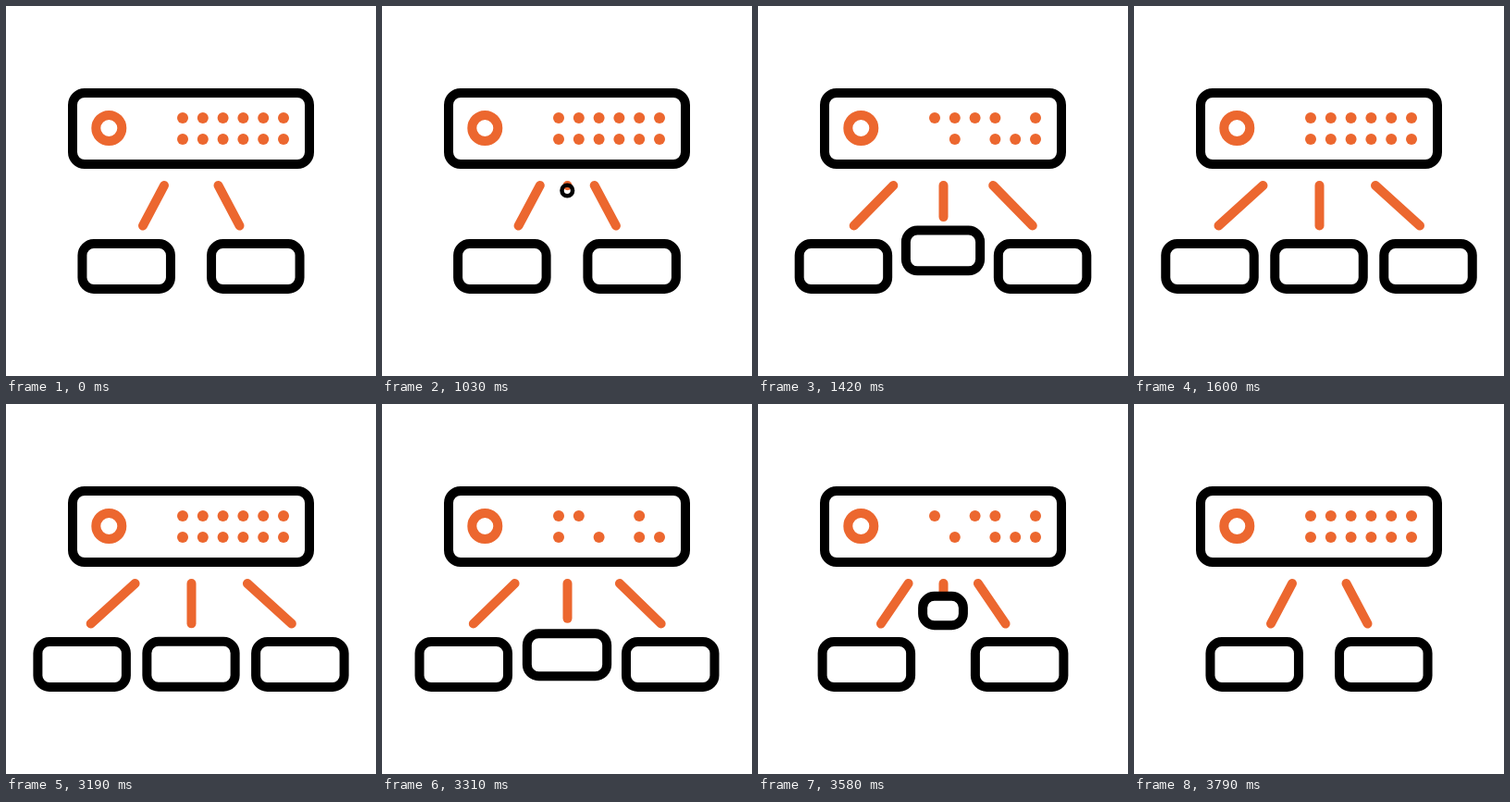
Recreate the animation shown at these times as an HTML page. Size 400x400 px, loop 3820 ms.

```html
<!DOCTYPE html>
<html lang="en">
<head>
<meta charset="utf-8">
<title>Router</title>
<style>
html, body { margin: 0; width: 100%; height: 100%; overflow: hidden; background: #fff; }
svg { display: block; width: 100%; height: 100%; }
.ink { fill: none; stroke: #000; stroke-width: 10; }
.hot { fill: none; stroke: #ec672f; stroke-width: 10; stroke-linecap: round; }
.dot { fill: #ec672f; }
</style>
</head>
<body>
<svg id="stage" viewBox="0 0 400 400"></svg>
<script>
const LOOP = 3820, STEP = 30;
const OPEN = [1000, 1600], CLOSE = [3170, 3790];
const BOX_W = 95.5, BOX_H = 49, BOX_Y = 281.5, LINE_TOP = 194, LINE_END = 237.5;

// Off window of each dot in ms after a move begins: top row, then bottom row
const BLINK = [
  [200, 330], [300, 420], [60, 180], [130, 265], [360, 480], [90, 210],
  [390, 510], [90, 200], [330, 450], [50, 160], [430, 540], [180, 300]
];

const stage = document.getElementById('stage');

function set(el, attrs) {
  for (const k in attrs) el.setAttribute(k, attrs[k]);
  return el;
}

function add(tag, attrs) {
  return stage.appendChild(set(document.createElementNS('http://www.w3.org/2000/svg', tag), attrs));
}

function setBox(el, cx, cy, w, h) {
  set(el, { x: cx - w / 2, y: cy - h / 2, width: w, height: h });
}

function setLine(el, x1, x2, y2) {
  set(el, { x1, y1: LINE_TOP, x2, y2 });
}

const lerp = (a, b, p) => a + (b - a) * p;
const ease = u => u * u * (3 - 2 * u);
const phase = (t, [a, b]) => Math.min(1, Math.max(0, (t - a) / (b - a)));

const line = () => add('line', { class: 'hot' });
const box = () => add('rect', { class: 'ink', rx: 12.5 });

add('rect', { class: 'ink', x: 72, y: 94, width: 256, height: 77, rx: 13 });
add('circle', { class: 'hot', cx: 111.3, cy: 132, r: 14 });
const dots = BLINK.map((_, i) => add('circle', {
  class: 'dot', cx: 191 + 21.8 * (i % 6), cy: i < 6 ? 121 : 144, r: 6
}));
const lineL = line(), lineM = line(), lineR = line();
const boxL = box(), boxM = box(), boxR = box();

function draw(time) {
  const t = Math.floor((time % LOOP - 10) / STEP) * STEP + 10;
  const u = phase(t, OPEN) - phase(t, CLOSE);
  const p = ease(u);

  setBox(boxL, lerp(130.2, 82, p), BOX_Y, BOX_W, BOX_H);
  setBox(boxR, lerp(269.8, 318, p), BOX_Y, BOX_W, BOX_H);
  setLine(lineL, lerp(171, 139.5, p), lerp(148, 91.5, p), LINE_END);
  setLine(lineR, lerp(229.5, 261, p), lerp(252.5, 309, p), LINE_END);

  // The middle box pops in as a ring, then stretches
  const shown = u > 0.001 ? 'visible' : 'hidden';
  const s = Math.min(1, u / 0.11);
  setLine(lineM, 200.5, 200.5, lerp(LINE_TOP, LINE_END, p));
  setBox(boxM, 200, lerp(202.5, BOX_Y, p), lerp(25, BOX_W, p), lerp(25, BOX_H, p));
  set(boxM, { visibility: shown, transform: `translate(200.5 196.5) scale(${s}) translate(-200.5 -196.5)` });
  set(lineM, { visibility: shown });

  const since = t - (t < CLOSE[0] ? OPEN[0] : CLOSE[0]);
  BLINK.forEach(([from, to], i) => {
    set(dots[i], { opacity: since >= from && since < to ? 0 : 1 });
  });
}

const start = performance.now();
function tick() {
  draw(performance.now() - start);
  requestAnimationFrame(tick);
}
tick();
</script>
</body>
</html>
```
